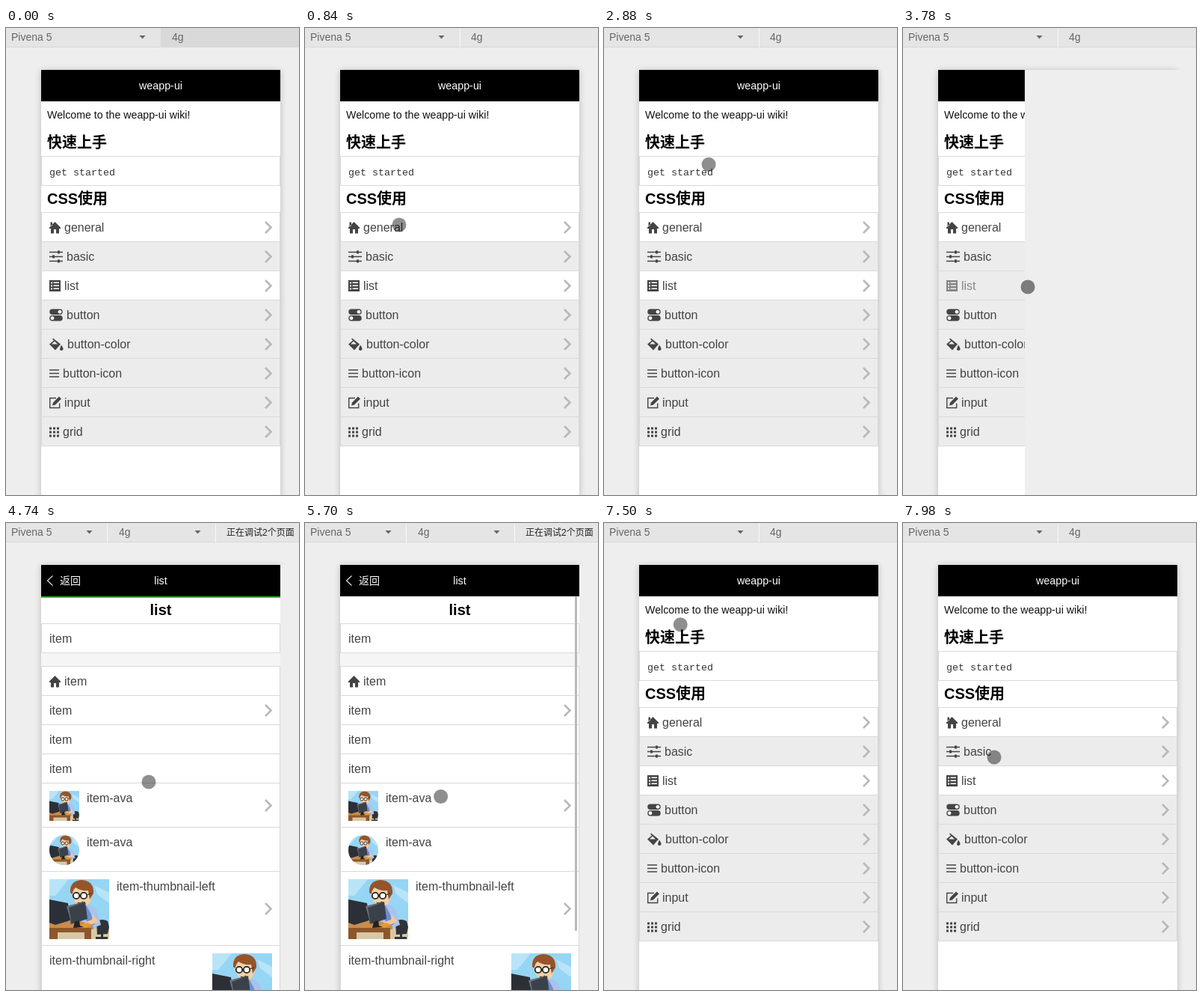
An HTML page that plays this animation: 392x624 px, repeating every 8000 ms.

```html
<!DOCTYPE html>
<html lang="en">
<head>
<meta charset="utf-8">
<title>weapp-ui</title>
<style>
html, body { margin: 0; width: 100%; height: 100%; overflow: hidden; background: #eee; }
svg { display: block; width: 100%; height: 100%; }
text { font-family: "Liberation Sans", "Noto Sans CJK SC", "Noto Sans CJK", sans-serif; white-space: pre; }
.tool { font-size: 14px; fill: #666; }
.bar { font-size: 14.3px; fill: #fff; }
.body { font-size: 14.2px; fill: #111; }
.head { font-size: 20px; font-weight: bold; fill: #000; }
.code { font: 13.33px "Liberation Mono", monospace; fill: #333; }
.row { font-size: 16px; fill: #444; }
.rule { fill: #d9d9d9; }
.icon { fill: #444; }
.line { fill: none; stroke: #444; stroke-width: 1.4; }
.arrow { fill: none; stroke: #b8b8b8; stroke-width: 2.6; }
</style>
</head>
<body>
<svg viewBox="0 0 392 624" preserveAspectRatio="none">
  <defs>
    <filter id="soft" x="-10%" y="-10%" width="120%" height="120%"><feGaussianBlur stdDeviation="4"/></filter>
    <clipPath id="screen"><rect x="47" y="98" width="320" height="526"/></clipPath>
    <clipPath id="round"><circle cx="40" cy="40" r="40"/></clipPath>
    <clipPath id="square"><rect width="80" height="80"/></clipPath>
    <g id="worker">
      <rect width="80" height="80" fill="#96d5f4"/>
      <path d="M0 0h26L8 22H0zM60 8l20 10v14L64 20z" fill="#b9e4f8"/>
      <path d="M0 66h80v14H0z" fill="#d8c9a4"/>
      <path d="M63 56q8-4 15 0l2 8-2 9-14 1z" fill="#303338"/>
      <path d="M69 72h3v6h-3zM62 77h16v3H62z" fill="#303338"/>
      <path d="M45 34q14-2 19 9l5 18-13 5-16-8z" fill="#a9c3ec"/>
      <path d="M49 34l6 11 6 15-8 4-6-14z" fill="#6c8fd0"/>
      <path d="M58 47l8 10-17 6-3-5 11-4z" fill="#f3c79a"/>
      <path d="M30 15q2-11 14-11 14 2 13 16-1 15-11 16-14 1-16-21z" fill="#f6cfa5"/>
      <path d="M28 18Q27 2 43 1q17 1 16 18l-5 8-2-12q-10 1-17-4-4 4-4 9z" fill="#96542a"/>
      <g fill="#fff" stroke="#222" stroke-width="1.8"><circle cx="36" cy="22" r="4.2"/><circle cx="46" cy="22" r="4.2"/></g>
      <path d="M50 21l6-2M38 31q4 2 7-1" fill="none" stroke="#332" stroke-width="1.3"/>
      <path d="M0 56h42l17 7v4H0z" fill="#c98c4d"/>
      <path d="M0 65h56v15h-9V71H11v9H0z" fill="#8d572b"/>
      <path d="M0 27l25 5 3 23-20 6-8-3z" fill="#2c3036"/>
      <path d="M23 36l25-6 3 23-22 7z" fill="#3b4148"/>
      <path d="M23 36l25-6-22 8 4 22z" fill="#6a7480"/>
      <path d="M34 57l6-2 1 7 5 2-14 1z" fill="#222"/>
      <path d="M42 61l9-3 6 3-9 4z" fill="#e59b2f"/>
    </g>
  </defs>
  <rect width="392" height="624" fill="#eee"/>
  <rect id="shadow" x="47" y="57" width="320" height="580" fill="#000" opacity=".22" filter="url(#soft)"/>
  <g id="home"></g>
  <g id="sub">
    <rect x="47" y="56" width="345" height="568" fill="#eee"/>
    <g id="loaded">
      <rect x="47" y="56" width="320" height="42"/>
      <path d="M62.500 70.500l-7 6.500 7 6.500" fill="none" stroke="#ddd" stroke-width="1.200"/>
      <text class="bar" x="72" y="82" style="font-size:14px">返回</text>
      <text id="title" class="bar" x="207" y="82" text-anchor="middle"></text>
    </g>
    <g id="content" clip-path="url(#screen)">
      <rect x="47" y="98" width="320" height="526" fill="#fff"/>
      <g id="list"></g>
      <rect id="thumb" x="361" width="3" height="447" rx="1.500" fill="#b9b9b9"/>
      <rect id="progress" x="47" y="98" height="2" fill="#38b232"/>
    </g>
  </g>
  <g id="tools"></g>
  <circle id="touch" r="9.500" fill="#000"/>
  <path id="hand" d="M-2 1q2-2 4 0v8l1-1q2 0 3 2 2-1 3 1 3-1 3 2v5q0 3-2 6H0l-5-9q-1-3 1-3l2 2z" fill="#fff" stroke="#111" stroke-width="1.200"/>
</svg>
<script>
const $ = id => document.getElementById(id);
const LOOP = 8000, MAX_SCROLL = 88;

const text = (kind, x, y, value, extra = "") => `<text class="${kind}" x="${x}" y="${y}" ${extra}>${value}</text>`;
const rect = (x, y, w, h, fill) => `<rect x="${x}" y="${y}" width="${w}" height="${h}" fill="${fill}"/>`;
const rule = y => `<rect class="rule" x="47" y="${y}" width="320" height="1"/>`;
const sides = (y, h) => [47, 366].map(x => `<rect class="rule" x="${x}" y="${y}" width="1" height="${h}"/>`).join("");
const arrow = y => `<path class="arrow" d="M347 ${y - 7.5}l7.500 7.500-7.500 7.500"/>`;
const solid = d => `<path class="icon" fill-rule="evenodd" d="${d}"/>`;
const stroke = d => `<path class="line" d="${d}"/>`;
const at = (x, y, inner) => `<g transform="translate(${x} ${y})">${inner}</g>`;
const worker = (x, y, scale, clip) =>
  `<g transform="translate(${x} ${y}) scale(${scale})"><g clip-path="url(#${clip})"><use href="#worker"/></g></g>`;

const dots = [0, 5, 10].flatMap(x => [-6, -1, 4].map(y => `M${x} ${y}h3v3h-3z`)).join("");
const house = "M7.500-7.500L15 0v1.500h-2V8H9V2.500H6V8H2V1.500H0V0z";
const icons = {
  general: solid(house + "M1.500-7h2.500v4L1.500-1z"),
  basic: stroke("M0-6h18M0 0h18M0 6h18") + solid("M11-8h3v4h-3zM4-2h3v4H4zM11 4h3v4h-3z"),
  list: solid("M0-7.500h15v15H0zM2-5h2v2H2zM5.500-5H13v1.500H5.500zM2-1h2v2H2zM5.500-1H13v1.500H5.500zM2 3h2v2H2zM5.500 3H13v1.500H5.500z"),
  button: solid("M4-8h10a3.700 3.700 0 0 1 0 7.500H4A3.700 3.700 0 0 1 4-8zM4 .5h10A3.700 3.700 0 0 1 14 8H4A3.700 3.700 0 0 1 4 .5z") +
    '<circle cx="14" cy="-4.200" r="2.400" fill="#fff"/><circle cx="4" cy="4.200" r="2.400" fill="#fff"/>',
  "button-color": solid("M5-8l10 8-7 8-8-8 6-5-2-2zM3 0h8L7-4zM16 1q3 4 2.500 6-2.500 3-4.500 0 0-2 2-6z"),
  "button-icon": stroke("M0-4.500h13M0 0h13M0 4.500h13"),
  input: stroke("M9-6H.7V7h13V1") + solid("M13-8l3 3-8 8-4 1 1-4z"),
  grid: solid(dots)
};
const labelX = { basic: 81, button: 81, "button-color": 82, "button-icon": 76, grid: 76 };

$("home").innerHTML = rect(47, 56, 320, 568, "#fff") + rect(47, 56, 320, 42, "#000") +
  text("bar", 207, 82, "weapp-ui", 'text-anchor="middle"') +
  text("body", 55, 121, "Welcome to the weapp-ui wiki!") +
  text("head", 55, 160, "快速上手") + text("head", 55, 235, "CSS使用") +
  rule(171) + rule(210) + sides(171, 40) + text("code", 58, 197, "get started") +
  Object.keys(icons).map((name, i) => {
    const y = 246 + i * 39, mid = y + 20.5;
    return `<rect id="row-${name}" x="48" y="${y}" width="318" height="39" fill="#ececec"/>` + rule(y) +
      `<g id="label-${name}">` + at(58, mid, icons[name]) +
      text("row", labelX[name] || 78, y + 26, name) + "</g>" + arrow(mid);
  }).join("") + rule(558) + sides(246, 313);

const listRow = (x, y, value) => text("row", x, y, value);
$("list").innerHTML = text("head", 207, 123, "list", 'text-anchor="middle"') +
  rect(47, 174, 320, 17, "#f5f5f4") + rect(47, 664, 320, 60, "#f8f8f6") +
  [134, 173, 191, 230, 269, 308, 347, 406, 465, 564, 663].map(rule).join("") +
  sides(134, 40) + sides(191, 473) +
  [160, 256, 295, 334].map(y => listRow(58, y, "item")).join("") +
  at(58, 211.5, solid(house)) + listRow(78, 217, "item") +
  listRow(108, 373, "item-ava") + listRow(108, 432, "item-ava") +
  listRow(148, 491, "item-thumbnail-left") + listRow(58, 590, "item-thumbnail-right") +
  worker(58, 358, .5, "square") + worker(58, 417, .5, "round") +
  worker(58, 476, 1, "square") + worker(276, 575, 1, "square") +
  [250.5, 377.5, 515.5].map(arrow).join("") +
  text("head", 55, 687, "space", 'style="font-size:15px"');

const caret = x => `<path d="M${x - 4} 10h8l-4 4.500z" fill="#666"/>`;
const gap = x => rect(x, 0, 1, 26, "#f8f8f8");
const toolbar = rect(0, 0, 392, 25, "#e5e5e5") + rect(0, 25, 392, 1, "#d8d8d8") + text("tool", 7, 17, "Pivena 5");
$("tools").innerHTML =
  `<g id="wide">${toolbar}${caret(182.5)}${gap(207)}<rect id="hover" x="207" width="185" height="25" fill="#d9d9d9"/>${text("tool", 222, 17, "4g")}</g>` +
  `<g id="narrow">${toolbar}${caret(111.5)}${gap(135)}${text("tool", 151, 17, "4g")}${caret(256.5)}${gap(280)}` +
  text("tool", 295, 17, "正在调试2个页面", 'style="font-size:12px;fill:#222"') + "</g>";

// Each step: time, then values interpolated linearly.
const pointer = [
  [120, 388, 10], [300, 314, 109], [480, 210, 161], [600, 155, 195], [720, 135, 222], [840, 126, 263],
  [1500, 126, 263], [1980, 100, 115], [2040, 82, 85], [2700, 82, 85], [2880, 140, 182], [3000, 151, 214],
  [3120, 164, 260], [3360, 167, 346], [3840, 167, 346], [4380, 191, 346], [4800, 191, 346],
  [5220, 190, 240], [5400, 190, 240], [5760, 180, 390], [5940, 180, 390], [6360, 191, 333],
  [6720, 212, 201], [6780, 212, 201], [7080, 97, 89], [7380, 97, 89], [7960, 122, 313]
];
const scrolling = [[4800, 0], [5160, MAX_SCROLL], [5400, MAX_SCROLL], [5640, 0], [5940, 0], [6360, 57], [6540, MAX_SCROLL]];
const visits = [
  { name: "general", open: 1020, ready: 1800, full: 2172, done: 2220, back: 2580 },
  { name: "list", open: 3660, ready: 4500, full: 4740, done: 4800, back: 7260 }
];

const ramp = (t, a, b) => Math.min(1, Math.max(0, (t - a) / (b - a)));
function sample(steps, t) {
  const i = steps.findIndex(s => s[0] > t);
  if (i === 0) return steps[0].slice(1);
  if (i < 0) return steps.at(-1).slice(1);
  const a = steps[i - 1], b = steps[i], p = ramp(t, a[0], b[0]);
  return a.slice(1).map((v, k) => v + (b[k + 1] - v) * p);
}
const set = (id, name, value) => $(id).setAttribute(name, value);
const show = (id, on) => set(id, "visibility", on ? "visible" : "hidden");

function draw(t) {
  const visit = visits.find(v => t >= v.open && t < v.back + 240);
  const since = visit ? t - visit.open : 0;
  const shift = visit ? 320 * (1 - ramp(since, 40, 167) + ramp(t, visit.back + 60, visit.back + 240)) : 320;
  const inList = visit?.name === "list";

  for (const { name } of visits) {
    const pressed = visit?.name === name && since < 240;
    show("row-" + name, pressed);
    set("label-" + name, "opacity", pressed ? .6 : 1);
  }
  set("sub", "display", visit && shift < 320 ? "inline" : "none");
  set("sub", "transform", `translate(${shift} 0)`);
  set("loaded", "display", since >= 240 ? "inline" : "none");
  set("content", "display", visit && t >= visit.ready ? "inline" : "none");
  $("title").textContent = visit ? visit.name : "";

  const [scroll] = sample(scrolling, t);
  set("list", "display", inList && t >= 4560 ? "inline" : "none");
  set("list", "transform", `translate(0 ${-scroll})`);
  set("thumb", "y", 98 + scroll * .895);
  set("thumb", "display", t >= 4800 && t < 6720 ? "inline" : "none");
  set("progress", "width", visit && t < visit.done ? 320 * ramp(t, visit.ready, visit.full) : 0);

  const narrow = since >= 420;
  set("narrow", "display", narrow ? "inline" : "none");
  set("wide", "display", narrow ? "none" : "inline");
  show("hover", t < 120);

  const [x, y] = sample(pointer, t);
  const inside = x < 367 && y > 56, onBar = visit && y < 98;
  show("touch", inside && !onBar);
  show("hand", inside && onBar);
  set("touch", "transform", `translate(${x} ${y})`);
  set("touch", "opacity", visit && since < 240 ? .48 : .44);
  set("hand", "transform", `translate(${x} ${y})`);
}

const began = performance.now();
function tick() {
  draw((performance.now() - began) % LOOP);
  requestAnimationFrame(tick);
}
tick();
</script>
</body>
</html>
```
